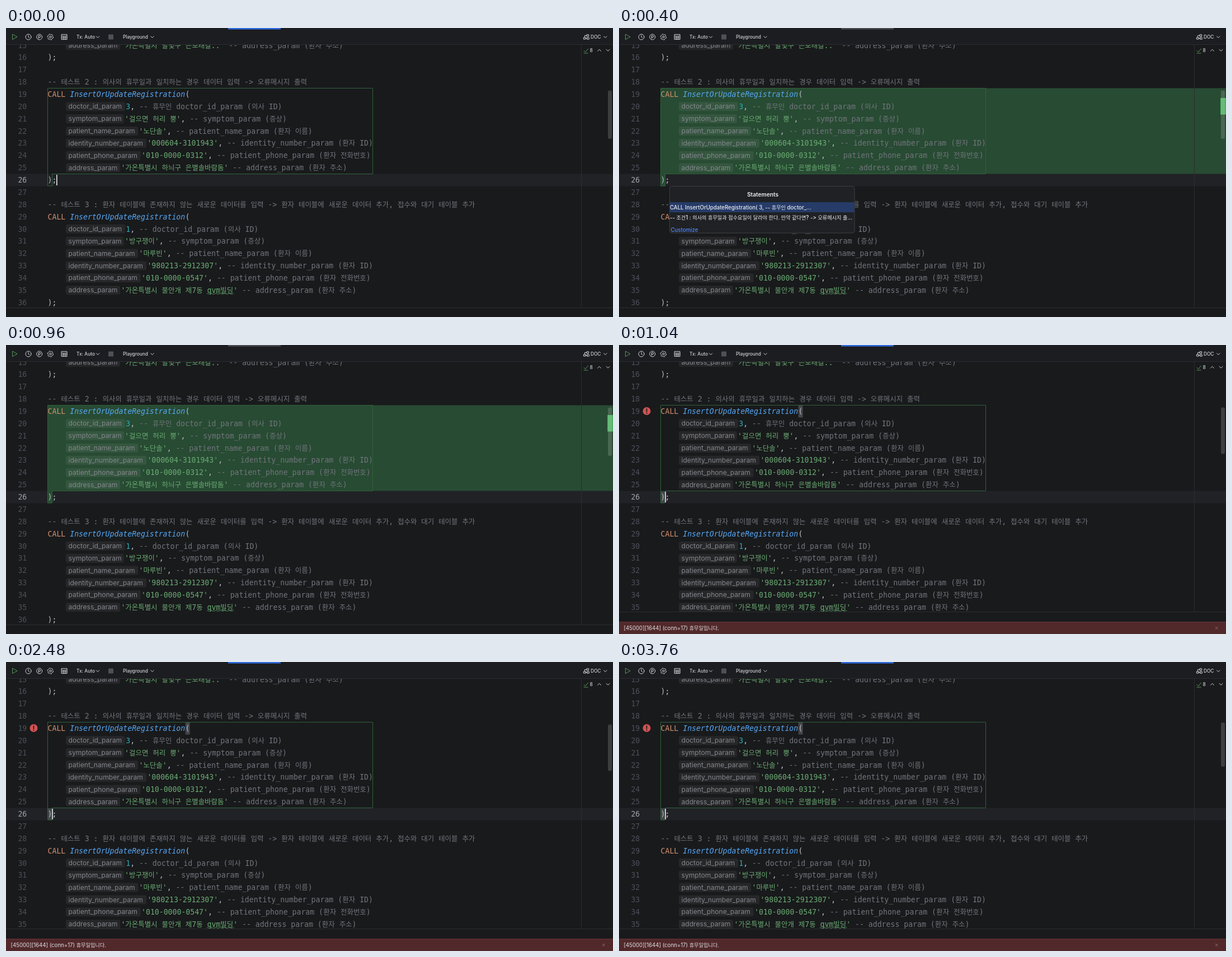
Recreate the animation shown at these times as an HTML page. Size 1085 by 516 pixels, loop 3840 ms.

```html
<!DOCTYPE html>
<html lang="ko">
<head>
<meta charset="utf-8">
<title>SQL editor</title>
<style>
html, body { margin: 0; width: 100%; height: 100%; overflow: hidden; background: #191a1c; }
svg { display: block; width: 1085px; height: 516px; }
text { white-space: pre; }
.mono { font: 13.17px "DejaVu Sans Mono", monospace; }
.ui { font: 9.65px Inter, sans-serif; fill: #dfe1e5; }
#popup .ui { font-weight: 500; fill: #eceef2; }
.bar { font: 500 8.3px Inter, sans-serif; fill: #ced0d6; }
.hint { font: 12.1px Inter, sans-serif; fill: #84878e; }
.ko { font-family: "Noto Sans CJK KR", "Noto Sans CJK", sans-serif; }
.mono .ko { font-size: 12.45px; }
.ui .ko { font-size: 9.13px; }
.com { fill: #71757c; }
.key { fill: #cf8e6d; }
.fn { fill: #56a8f5; font-style: italic; }
.str { fill: #6aab73; }
.num { fill: #2aacb8; }
.txt { fill: #bcbec4; }
.no { fill: #4b5059; text-anchor: end; }
.now { fill: #a1a3ab; }
.icon { fill: none; stroke: #ced0d6; stroke-width: 1; stroke-linecap: round; stroke-linejoin: round; }
.rule { fill: none; stroke: #2b2d30; }
</style>
</head>
<body>
<svg viewBox="0 0 1085 516">
  <rect width="1085" height="516" fill="#191a1c"/>
  <rect y="260.5" width="1085" height="22" fill="#212226"/>
  <path id="fill" d="M75 107.5H1085V260.5H82.5V282.3H75Z" fill="#284b33"/>
  <path class="rule" d="M1028.5 30V500"/>
  <g id="match" fill="#43454a">
    <rect x="320.6" y="108" width="8" height="21.5"/>
    <rect x="75" y="261" width="8" height="21"/>
  </g>
  <path d="M74.5 107.5H655.5V260.5H82.5V282H74.5Z" fill="none" stroke="#2f6339"/>
  <g id="code" class="mono"></g>
  <path id="wave" fill="none" stroke="#5b9c66"/>
  <rect id="caret" y="262" width="1.6" height="19" fill="#e6e8ec"/>
  <g id="error">
    <circle cx="49.5" cy="118" r="7" fill="#d15252"/>
    <path d="M49.5 114V119" stroke="#191a1c" stroke-width="1.7" stroke-linecap="round"/>
    <circle cx="49.5" cy="121.7" r="1" fill="#191a1c"/>
  </g>
  <rect id="mark" x="1075" y="125" width="10" height="29.5" fill="#4cae60"/>
  <rect id="thumb" x="1076" width="7" rx="3" fill="#fff" fill-opacity=".16"/>

  <path d="M1033 40.3L1035.6 43L1040.4 37M1033 45H1040" class="icon" style="stroke:#57965c"/>
  <text x="1043.5" y="43" class="bar">8</text>
  <path class="icon" d="M1057.5 41.2L1060.5 38.3L1063.5 41.2M1073 38.3L1076 41.2L1079 38.3"/>

  <rect width="1085" height="29.5" fill="#1c1d20"/>
  <path class="rule" d="M0 29.5H1085"/>
  <rect id="tab" x="397" width="94" height="2.6"/>
  <path class="icon" d="M11.5 11.5V20.5L19.8 16Z" style="stroke:#57965c"/>
  <g class="icon">
    <circle cx="40" cy="16" r="5"/><path d="M40 13V16.3L42 17.4"/>
    <circle cx="59.7" cy="16" r="5"/><path d="M58.3 19V13.4H60.2A1.6 1.6 0 0 1 60.2 16.7H58.3"/>
    <path id="gear"/><circle cx="79.3" cy="16" r="1.7"/>
    <path d="M99.5 11.5H109V20.5H99.5ZM99.5 14.5H109M99.5 17.5H109M102.7 14.5V20.5M105.8 14.5V20.5"/>
    <path d="M161.3 14.8L164 17.5L166.7 14.8M258.8 14.8L261.5 17.5L264.2 14.8M1068.5 14.8L1071.2 17.5L1073.9 14.8"/>
    <path d="M1032.8 16.8H1036V20H1032.8ZM1039 17H1042.2V20.2H1039ZM1038.4 11.8H1041.6V15H1038.4ZM1036 18.5H1039M1034.4 16.8V13.4H1038.4"/>
  </g>
  <rect x="183" y="11.5" width="9" height="9" rx="1" fill="#4e5157"/>
  <text class="bar" x="126" y="19">Tx: Auto</text>
  <text class="bar" x="209" y="19">Playground</text>
  <text class="bar" x="1045" y="19">DOC</text>

  <g id="foot">
    <rect y="0" width="1085" height="45" fill="#191a1c"/>
    <path class="rule" d="M0 .5H1085"/>
  </g>
  <g id="status">
    <rect y="494" width="1085" height="22" fill="#52292b"/>
    <path d="M0 494.5H1085" stroke="#653336"/>
    <path d="M1066 503L1070.5 507.5M1070.5 503L1066 507.5" stroke="#8b6b6d"/>
  </g>
  <g id="popup">
    <rect x="90.5" y="282.5" width="330.5" height="83.5" rx="4" fill="#1f2124" stroke="#3c3e42"/>
    <rect x="91" y="311" width="329.5" height="18" fill="#263b68"/>
    <text class="ui" x="257" y="300.5" text-anchor="middle" style="font-weight:600;font-size:10.2px">Statements</text>
    <text class="ui" x="92.5" y="363.5" style="fill:#548af7">Customize</text>
  </g>
</svg>
<script>
const LOOP = 3840, CELL = 7.93, HANGUL = 11.45, LEFT = 74.6;
const $ = id => document.getElementById(id);

function add(parent, tag, attrs, text) {
  const el = document.createElementNS("http://www.w3.org/2000/svg", tag);
  for (const k in attrs) el.setAttribute(k, attrs[k]);
  if (text !== undefined) el.textContent = text;
  parent.appendChild(el);
  return el;
}

const runs = s => s.match(/[가-힣]+|[^가-힣]+/g);
const isKo = s => /[가-힣]/.test(s);
const baseline = n => 123 + (n - 19) * 21.87;

// Latin letters take one cell, Hangul its own wider advance
function write(n, x, ...parts) {
  for (const [cls, s] of parts) {
    for (const r of runs(s)) {
      const ko = isKo(r);
      add($("code"), "text", { x, y: baseline(n), class: cls + (ko ? " ko" : "") }, r);
      x += r.length * (ko ? HANGUL : CELL);
    }
  }
}

const argX = {
  doctor_id_param: 214.3, symptom_param: 212.1, patient_name_param: 237.5,
  identity_number_param: 252.4, patient_phone_param: 242.1, address_param: 205.4
};

function arg(n, name, value, label, note = "", sep = ", ") {
  const x = argX[name], y = baseline(n);
  add($("code"), "rect", { x: 107, y: y - 12.7, width: x - 108.4, height: 16, rx: 3, fill: "#fff", "fill-opacity": .06 });
  add($("code"), "text", { x: 111.5, y: y - .6, class: "hint" }, name);
  write(n, x, [value[0] === "'" ? "str" : "num", value], ["txt", sep], ["com", `-- ${note}${name} (${label})`]);
}

function call(n, id, note, symptom, patient, number, phone, address) {
  write(n, LEFT, ["key", "CALL "], ["fn", "InsertOrUpdateRegistration"], ["txt", "("]);
  arg(n + 1, "doctor_id_param", id, "의사 ID", note);
  arg(n + 2, "symptom_param", symptom, "증상");
  arg(n + 3, "patient_name_param", patient, "환자 이름");
  arg(n + 4, "identity_number_param", number, "환자 ID");
  arg(n + 5, "patient_phone_param", phone, "환자 전화번호");
  arg(n + 6, "address_param", address, "환자 주소", "", " ");
  write(n + 7, LEFT, ["txt", ");"]);
}

function flow(parent, x, y, s) {
  const t = add(parent, "text", { x, y, class: "ui" });
  for (const r of runs(s)) add(t, "tspan", isKo(r) ? { class: "ko" } : {}, r);
}

for (let n = 15; n <= 36; n++)
  add($("code"), "text", { x: 37.3, y: baseline(n), class: n === 26 ? "no now" : "no" }, n);

arg(15, "address_param", "'가온특별시 달빛구 은모래길..'", "환자 주소", "", " ");
write(16, LEFT, ["txt", ");"]);
write(18, LEFT, ["com", "-- 테스트 2 : 의사의 휴무일과 일치하는 경우 데이터 입력 -> 오류메시지 출력"]);
call(19, "3", "휴무인 ", "'걸으면 허리 뿡'", "'노단솔'", "'000604-3101943'",
  "'010-0000-0312'", "'가온특별시 하늬구 은별솔바람돔'");
write(28, LEFT, ["com", "-- 테스트 3 : 환자 테이블에 존재하지 않는 새로운 데이터를 입력 -> 환자 테이블에 새로운 데이터 추가, 접수와 대기 테이블 추가"]);
call(29, "1", "", "'방구쟁이'", "'마루빈'", "'980213-2912307'",
  "'010-0000-0547'", "'가온특별시 물안개 제7동 qvm빌딩'");

flow($("popup"), 91, 323.5, "CALL InsertOrUpdateRegistration( 3, -- 휴무인 doctor_...");
flow($("popup"), 91, 341.5, "-- 조건1 : 의사의 휴무일과 접수요일이 달라야 한다. 만약 같다면? -> 오류메시지 출...");
flow($("status"), 8.5, 508.8, "[45000][1644] (conn=17) 휴무일입니다.");

let wave = "M359 474.5";
for (let i = 0; i < 12; i++) wave += `q1 ${i % 2 ? 2 : -2} 2 0t2 0`;
$("wave").setAttribute("d", wave);

let gear = "";
for (let i = 0; i < 24; i++) {
  const a = (i + .5) * Math.PI / 12, r = i % 4 < 2 ? 5.3 : 4.2;
  gear += `${i ? "L" : "M"}${(79.3 + r * Math.cos(a)).toFixed(2)} ${(16 + r * Math.sin(a)).toFixed(2)}`;
}
$("gear").setAttribute("d", gear + "Z");

const show = (id, on) => $(id).setAttribute("visibility", on ? "visible" : "hidden");
const set = (id, attrs) => { for (const k in attrs) $(id).setAttribute(k, attrs[k]); };

function draw(t) {
  const failed = t >= 1040, running = t >= 160 && !failed, settled = t >= 3120;
  show("fill", running);
  show("mark", running);
  show("popup", running && t < 800);
  show("caret", !running);
  for (const id of ["match", "error", "status"]) show(id, failed);
  set("caret", { x: failed ? 82.3 : 90 });
  set("tab", { fill: running ? "#4a4c51" : "#3069dc" });
  set("foot", { transform: `translate(0 ${failed ? 476 : 499})` });
  set("thumb", { y: settled ? 108 : 111.5, height: settled ? 79 : failed ? 83 : 86.5 });
}

function tick() {
  draw(performance.now() % LOOP);
  requestAnimationFrame(tick);
}
tick();
</script>
</body>
</html>
```
